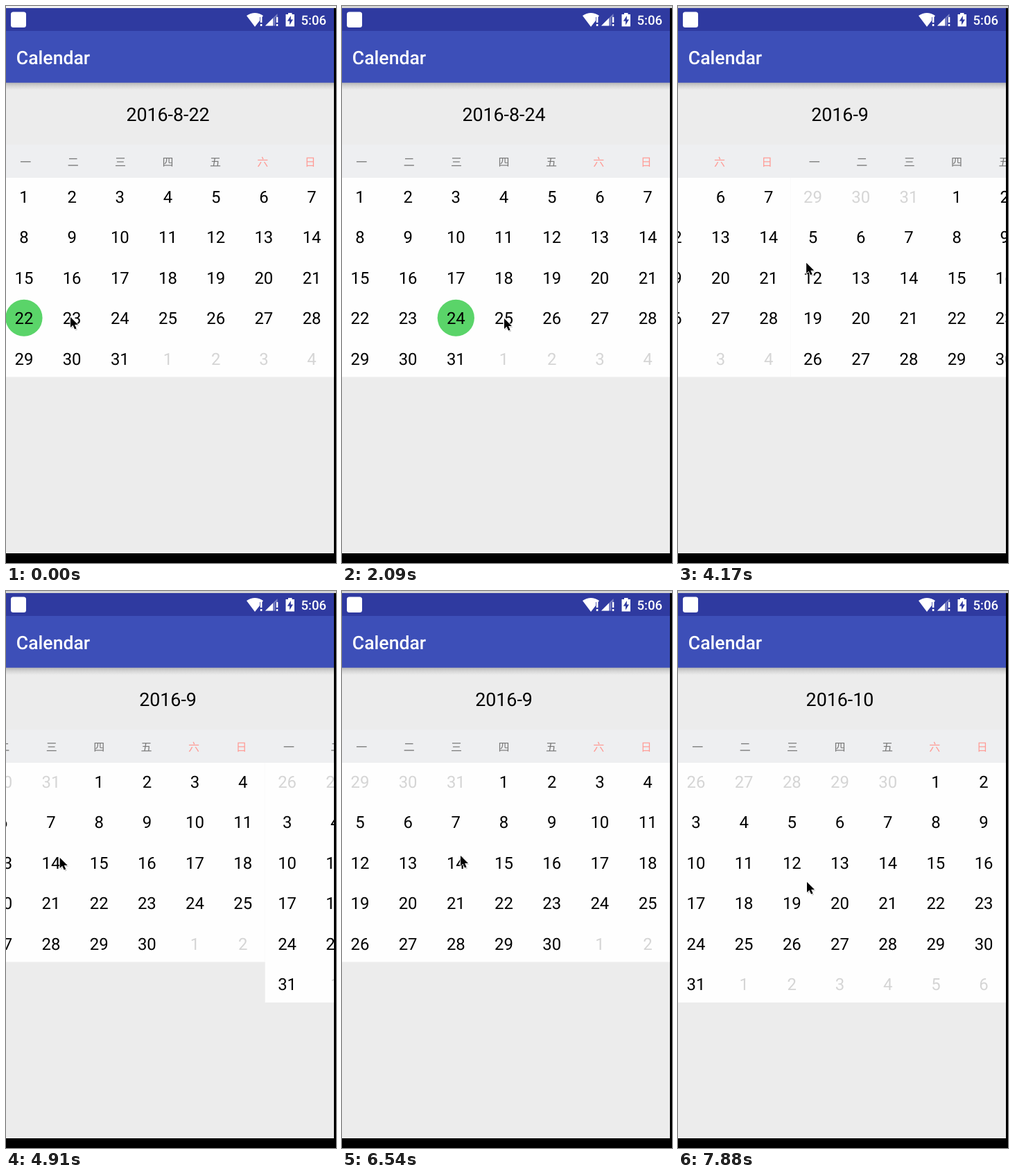
An HTML page that plays this animation: 476 px wide and 804 px high, repeating every 8 s.

```html
<!DOCTYPE html>
<html lang="en">
<head>
<meta charset="utf-8">
<title>Calendar</title>
<style>
  html, body { margin: 0; width: 100%; height: 100%; overflow: hidden; background: #000; }
  svg { display: block; width: 476px; height: 804px; font-family: Roboto, sans-serif; text-rendering: geometricPrecision; }
  .day, .week, #date { text-anchor: middle; }
  .day { font-size: 23.9px; }
  .out { fill: #d5d5d5; }
  .week { font: 16px "Noto Sans CJK SC", "Noto Sans CJK JP", "Noto Sans CJK", sans-serif; fill: #777; }
  .rest { fill: #ff9a94; }
  #date { font-size: 26.8px; }
  .bar { fill: #fff; font-weight: 500; }
</style>
</head>
<body>
<svg viewBox="0 0 476 804">
  <defs>
    <linearGradient id="shade" x2="0" y2="1">
      <stop stop-color="#b2b2b2"/><stop offset=".5" stop-color="#d4d4d4"/><stop offset="1" stop-color="#ececec"/>
    </linearGradient>
    <clipPath id="screen"><rect width="473" height="790"/></clipPath>
    <path id="arrow" d="M0 0V15L3.5 11.8L6 17.5L8.600 16.4L6.1 10.9H11Z"/>
  </defs>
  <rect id="edge" width="476" height="3"/>
  <g clip-path="url(#screen)">
    <rect y="110" width="473" height="680" fill="#ececec"/>
    <rect y="200" width="473" height="48" fill="#eeeff1"/>
    <rect y="110" width="473" height="11" fill="url(#shade)"/>
    <rect y="3" width="473" height="33" fill="#2f3aa0"/>
    <rect y="36" width="473" height="74.7" fill="#3d4fb8"/>
    <g id="pages"></g>
  </g>
  <text class="bar" x="14.8" y="83.7" font-size="26.6">Calendar</text>
  <text id="date" x="233.5" y="166"></text>
  <g fill="#fff">
    <rect x="7" y="8.500" width="22" height="22.500" rx="3.500"/>
    <path d="M347 14Q359 6 371 14L369.5 16H366V21L359 30Z"/>
    <path d="M366.8 16h2.6v8h-2.6zm0 10h2.6v3h-2.6z"/>
    <path d="M374 28.5L391.5 11V16H388.5V28.5Z" opacity=".35"/>
    <path d="M374 28.5L385 17.5V28.5Z"/>
    <path d="M389.8 16h2.5v8h-2.5zm0 10h2.5v3h-2.5z"/>
    <path d="M403.5 12H407V10h5.5v2H416V29.5H403.5Z"/>
    <path d="M410.8 14L405.8 21.8H409V27.5L414 19.6H410.8Z" fill="#2f3aa0"/>
  </g>
  <text class="bar" x="425.5" y="27" font-size="18.6">5:06</text>
  <g id="cursor">
    <use href="#arrow" x="1.5" y="2" opacity=".2"/>
    <use href="#arrow" stroke="#fff" stroke-width="1.5" paint-order="stroke"/>
  </g>
</svg>
<script>
const LOOP = 8000, TICK = 148.6;
const PAGE = 479, DP = PAGE / 360, LEFT = -6, TOP = 248;
const CELL = 40 * DP, COL = 52 * DP, ROW = 44 * DP;
const $ = id => document.getElementById(id);

function add(parent, tag, attrs, text = '') {
  const node = document.createElementNS('http://www.w3.org/2000/svg', tag);
  for (const key in attrs) node.setAttribute(key, attrs[key]);
  node.textContent = text;
  return parent.appendChild(node);
}

const cellX = i => LEFT + 4 * DP + CELL / 2 + COL * (i % 7);
const cellY = i => TOP + CELL / 2 + ROW * Math.floor(i / 7);

function buildMonth(month, index) {
  const page = add($('pages'), 'g', { transform: `translate(${index * PAGE})` });
  const lead = (new Date(2016, month, 1).getDay() + 6) % 7;
  const rows = Math.ceil((lead + new Date(2016, month + 1, 0).getDate()) / 7);
  add(page, 'rect', { x: LEFT, y: TOP, width: PAGE, height: CELL + ROW * (rows - 1), fill: '#fefefe' });
  [...'一二三四五六日'].forEach((name, i) =>
    add(page, 'text', { class: i > 4 ? 'week rest' : 'week', x: LEFT + (i + 0.5) * PAGE / 7, y: 231 }, name));
  const mark = add(page, 'circle', { r: CELL / 2, fill: '#5ad469', visibility: 'hidden' });
  for (let i = 0; i < rows * 7; i++) {
    const date = new Date(2016, month, 1 - lead + i);
    const type = date.getMonth() === month ? 'day' : 'day out';
    add(page, 'text', { class: type, x: cellX(i), y: cellY(i) + 9.1 }, date.getDate());
  }
  return mark;
}

const [mark] = [7, 8, 9].map(buildMonth);
mark.setAttribute('visibility', 'visible');

const easeOut = p => 1 - (1 - p) ** 1.6;
const easeInOut = p => p * p * (3 - 2 * p);

// Glides run from one tick to another and end at the given values.
function glide(start, moves, ease) {
  return tick => moves.reduce((now, { from, to, end }) => {
    const part = ease(Math.min(1, Math.max(0, (tick - from) / (to - from))));
    return now.map((v, i) => v + (end[i] - v) * part);
  }, start);
}

const pointer = glide([93, 449], [
  { from: 7, to: 9, end: [159, 447] },
  { from: 12, to: 14, end: [234, 451] },
  { from: 17, to: 21, end: [237, 331] },
  { from: 23, to: 25, end: [350, 345] },
  { from: 25, to: 29, end: [165, 374] },
  { from: 29, to: 31, end: [205, 385] },
  { from: 31, to: 35, end: [15, 385] },
  { from: 35, to: 39, end: [140, 369] },
  { from: 39, to: 41, end: [171, 382] },
  { from: 45, to: 48, end: [60, 396] },
  { from: 48, to: 50, end: [166, 417] },
  { from: 51, to: 53, end: [186, 420] }
], easeOut);

// Pages scrolled: a swipe, a drag that springs back, a second swipe.
const scroll = glide([0], [
  { from: 25, to: 30, end: [1] },
  { from: 30, to: 35, end: [1.32] },
  { from: 35, to: 44, end: [1] },
  { from: 45, to: 50, end: [2] }
], easeInOut);

const picks = { 0: 22, 5: 23, 11: 24, 16: 25, 22: 11 };
const titles = { 28: '2016-9', 48: '2016-10' };
const latest = (steps, tick) => steps[Object.keys(steps).findLast(key => key <= tick)];

function draw(time) {
  const tick = Math.floor((time % LOOP + 4) / TICK);
  const day = latest(picks, tick);
  const light = 242 - Math.min(tick, 3) * 10;
  $('edge').setAttribute('fill', `rgb(${light},${light},${light})`);
  $('pages').setAttribute('transform', `translate(${-scroll(tick)[0] * PAGE})`);
  $('cursor').setAttribute('transform', `translate(${pointer(tick)})`);
  $('date').textContent = latest(titles, tick) || `2016-8-${day}`;
  mark.setAttribute('cx', cellX(day - 1));
  mark.setAttribute('cy', cellY(day - 1));
}

const start = performance.now();
function loop() {
  draw(performance.now() - start);
  requestAnimationFrame(loop);
}
loop();
</script>
</body>
</html>
```
